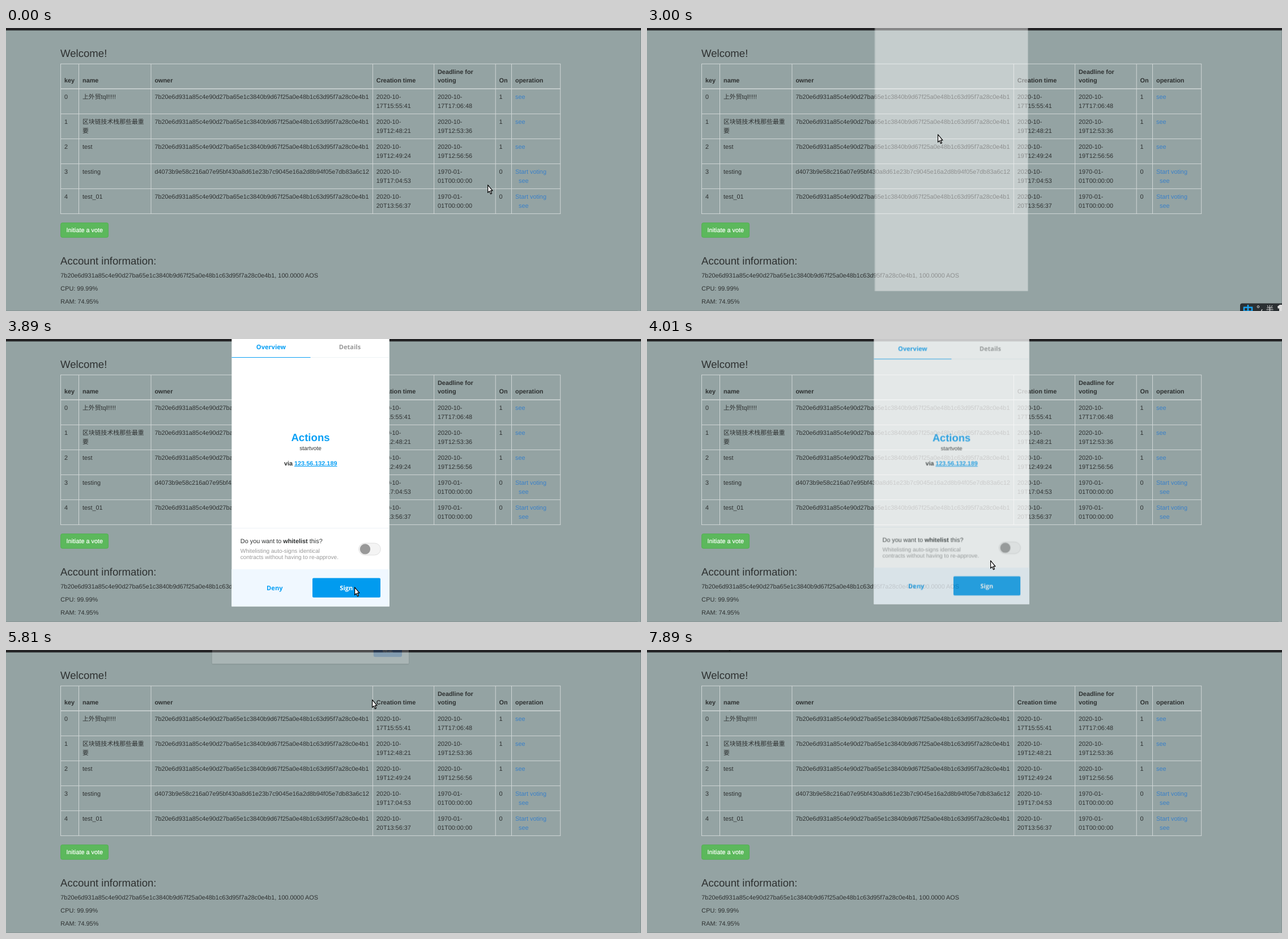
Animation, 1121 px wide and 499 px high, one loop 8 s. Source, as an HTML page:

```html
<!DOCTYPE html>
<html lang="en">
<head>
<meta charset="utf-8">
<title>Voting page</title>
<style>
html, body { margin: 0; width: 100%; height: 100%; overflow: hidden; background: #94a3a3; }
svg { display: block; width: 100vw; height: 100vh; font: 10.86px "Liberation Sans", "Noto Sans CJK SC", "Noto Sans CJK", sans-serif; fill: #2e3131; text-rendering: geometricPrecision; }
.bold { font-weight: 700; }
.heading { font-size: 18.6px; }
.link { fill: #3a80c8; }
.grid { fill: none; stroke: #d0d6d6; }
.mid { text-anchor: middle; }
.ui { font: 700 11.1px "Open Sans", sans-serif; text-anchor: middle; }
.small { font-size: 10.06px; }
.blue { fill: #0aa0f5; }
.grey { fill: #999; }
.white { fill: #fff; }
.sheet { fill: #fff; filter: drop-shadow(0 1px 1.2px rgba(0, 0, 0, .6)); }

.anim { animation: 8s step-end infinite; }
#popup { animation-name: popup; transform-origin: 537.5px 213px; }
#content { animation-name: content; }
#sign { animation-name: sign; }
#ime { animation-name: ime; }
#alert { animation-name: alert; }
#arrow { animation-name: arrow; }
#beam { animation-name: beam; }

@keyframes popup {
  0%, 53.125% { opacity: 0; transform: none; }
  37.5% { opacity: .46; transform: scale(.971); }
  39% { opacity: .9; transform: scale(.994); }
  40.5% { opacity: 1; transform: none; }
  50.125% { opacity: .75; transform: scale(.985); }
  51.625% { opacity: .25; transform: scale(.96); }
}
@keyframes content {
  0%, 53.125% { opacity: 0; }
  40.5% { opacity: 1; }
}
@keyframes sign {
  0%, 53.125% { fill: #08a6fb; }
  46.75% { fill: #019bef; }
}
@keyframes ime {
  0%, 39%, 53.125% { opacity: 0; }
  37.5%, 51.625% { opacity: 1; }
}
@keyframes alert {
  0%, 74.25% { opacity: 0; transform: none; }
  60.375% { opacity: 1; transform: none; }
  61.875% { opacity: 1; transform: translateY(1px); }
  72.625% { opacity: .2; transform: translateY(-10px); }
}
@keyframes arrow {
  0% { transform: translate(850px, 276px); }
  1.625% { transform: translate(531px, 190px); }
  3.5% { transform: translate(513px, 187px); }
  42.25% { transform: translate(526px, 232px); }
  43.75% { transform: translate(560px, 325px); }
  45.25% { transform: translate(597px, 405px); }
  46.75% { transform: translate(613px, 435px); }
  48.625% { transform: translate(615px, 437px); }
  50.125% { transform: translate(606px, 390px); }
  51.625% { transform: translate(578px, 282px); }
  53.125% { transform: translate(561px, 216px); }
  65.375% { transform: translate(608px, 76px); }
  67.25% { transform: translate(652px, 32px); }
  68.875% { transform: translate(675px, 11px); }
  70.75% { transform: translate(666px, 2px); }
  72.625% { transform: translate(646px, 87px); }
  74.25% { transform: translate(615px, 150px); }
  77.75% { transform: translate(614px, 150px); }
  79.625% { transform: translate(783px, -40px); }
  81.5% { transform: translate(848px, 22px); }
  83.125% { transform: translate(884px, -1px); }
  85% { transform: translate(903px, -5px); }
  86.625% { transform: translate(909px, -9px); }
  88.5% { transform: translate(888px, -9px); }
  90.375% { transform: translate(600px, 48px); }
  91.875% { transform: translate(324px, 36px); }
  93.75% { transform: translate(205px, 4px); }
  95.25% { transform: translate(140px, -15px); }
  97.125%, 100% { transform: translate(140px, -16px); }
}
@keyframes beam {
  0%, 81.5% { opacity: 0; }
  79.625% { opacity: 1; }
}
</style>
</head>
<body>
<svg viewBox="0 0 1121 499" preserveAspectRatio="none">
  <rect width="1121" height="499" fill="#94a3a3"/>
  <rect width="1121" height="4.3" fill="#222224"/>
  <path d="M1120.5 4V499M0 498.7H1115" stroke="#7f8c8c" stroke-width=".8"/>

  <text class="heading" x="96" y="51.2">Welcome!</text>
  <path class="grid" d="M96.5 63.3H979M96.5 151.4H979M96.5 195.4H979M96.5 239.4H979M96.5 283.4H979M96.5 327.4H979
    M96.5 63V328M128.5 63V328M256 63V328M647.4 63V328M755.6 63V328M864.2 63V328M892.5 63V328M978.7 63V328"/>
  <path class="grid" d="M96.5 107.2H979" stroke-width="1.5"/>
  <g id="table"></g>

  <rect x="96.6" y="343.5" width="84" height="25.8" rx="3" fill="#5cb85c" stroke="#4cae4c" stroke-width=".8"/>
  <text class="white" x="106.5" y="360" stroke="#fff" stroke-width=".2">Initiate a vote</text>

  <text class="heading" x="96" y="417.2">Account information:</text>
  <text id="account" x="96.3" y="439.7"></text>
  <text x="96.3" y="463">CPU: 99.99%</text>
  <text x="96.3" y="486">RAM: 74.95%</text>

  <g id="popup" class="anim">
    <rect x="398.4" y="-45" width="278.4" height="516.5" fill="#fff"/>
    <g id="content" class="anim">
      <text class="ui blue" x="468" y="18.3">Overview</text>
      <text class="ui grey" x="607" y="18.3">Details</text>
      <path d="M537 32.5H676.8M398.4 333.5H676.8" stroke="#eef2f5"/>
      <path d="M398.4 32.5H537.5" stroke="#0aa0f5"/>
      <text class="bold mid blue" x="537.5" y="180" font-size="18.6">Actions</text>
      <text class="small mid" x="537.5" y="195.5">startvote</text>
      <text class="bold mid" x="537.7" y="223">via <tspan class="blue" text-decoration="underline">123.56.132.189</tspan></text>
      <text x="413.8" y="360">Do you want to <tspan class="bold">whitelist</tspan> this?</text>
      <text class="small grey" x="413.8" y="376.5">Whitelisting auto-signs identical</text>
      <text class="small grey" x="413.8" y="388.3">contracts without having to re-approve.</text>
      <rect x="622.7" y="360" width="38.6" height="21" rx="10.5" fill="#f4f4f4" stroke="#dedede"/>
      <circle cx="634" cy="370.4" r="9.2" fill="#999"/>
      <rect x="398.4" y="406" width="278.4" height="65.5" fill="#f0f8ff"/>
      <text class="ui blue" x="474.3" y="442.5">Deny</text>
      <rect id="sign" class="anim" x="541" y="421.5" width="120" height="34.3" rx="2"/>
      <text class="ui white" x="600.8" y="442.5">Sign</text>
    </g>
  </g>

  <g id="ime" class="anim">
    <rect x="1047" y="485.5" width="80" height="20" rx="4" fill="#2b3033"/>
    <text class="bold mid" x="1061" y="504.5" font-size="20" fill="#1ba5f2">中</text>
    <circle cx="1079" cy="491.5" r="1.8" fill="none" stroke="#ddd"/>
    <path d="M1086 496l-1.5 3" stroke="#ddd" stroke-width="1.4"/>
    <text class="mid" x="1099.5" y="500" font-size="13.5" fill="#ddd">半</text>
    <path d="M1113 491l4-3h5v12h-6v-6l-2 1z" fill="#ddd"/>
  </g>

  <g id="alert" class="anim">
    <rect class="sheet" x="363.8" y="-20" width="347.2" height="54.2" rx="1.5"/>
    <rect x="648.8" y="-8" width="50.2" height="30.2" rx="3" fill="#4289ea"/>
    <text class="mid bold" x="674" y="13.7" font-size="9.5" fill="#e8f1fd">确定</text>
  </g>

  <path id="arrow" class="anim" d="M.6.8V14.3L3.5 11.6 5.5 16.6 7.5 15.7 5.5 10.9H9z" fill="#fff" stroke="#000" stroke-width="1.2" stroke-linejoin="round"/>
  <path id="beam" class="anim" d="M780 60.5H787M783.5 60.5V73.5M780 73.5H787" fill="none" stroke="#111"/>
</svg>
<script>
const ownerA = "7b20e6d931a85c4e90d27ba65e1c3840b9d67f25a0e48b1c63d95f7a28c0e4b1";
const ownerB = "d4073b9e58c216a07e95bf430a8d61e23b7c9045e16a2d8b94f05e7db83a6c12";
const unset = ["1970-01-", "01T00:00:00"];
const open = ["see"], closed = ["Start voting", "\u00a0\u00a0see"];
const columns = [103, 135, 262.4, 653.8, 762, 870.5, 899];
const lineHeight = 15.5;
const table = document.getElementById("table");

function addText(x, y, text, className) {
  const node = document.createElementNS("http://www.w3.org/2000/svg", "text");
  node.setAttribute("x", x);
  node.setAttribute("y", y);
  node.setAttribute("class", className);
  node.textContent = text;
  table.append(node);
}

["key", "name", "owner", "Creation time", "voting", "On", "operation"]
  .forEach((title, i) => addText(columns[i], 96, title, "bold"));
addText(columns[4], 80.5, "Deadline for", "bold");

const rows = [
  [["上外贸tql!!!!!"], ownerA, ["2020-10-", "17T15:55:41"], ["2020-10-", "17T17:06:48"], 1, open],
  [["区块链技术栈那些最重", "要"], ownerA, ["2020-10-", "19T12:48:21"], ["2020-10-", "19T12:53:36"], 1, open],
  [["test"], ownerA, ["2020-10-", "19T12:49:24"], ["2020-10-", "19T12:56:56"], 1, open],
  [["testing"], ownerB, ["2020-10-", "19T17:04:53"], unset, 0, closed],
  [["test_01"], ownerA, ["2020-10-", "20T13:56:37"], unset, 0, closed]
];
rows.forEach((row, key) => [key, ...row].forEach((cell, col) =>
  [cell].flat().forEach((line, i) =>
    addText(columns[col], 125 + key * 44 + i * lineHeight, line, col === 6 ? "link" : ""))));

document.getElementById("account").textContent = ownerA + ", 100.0000 AOS";
</script>
</body>
</html>
```
